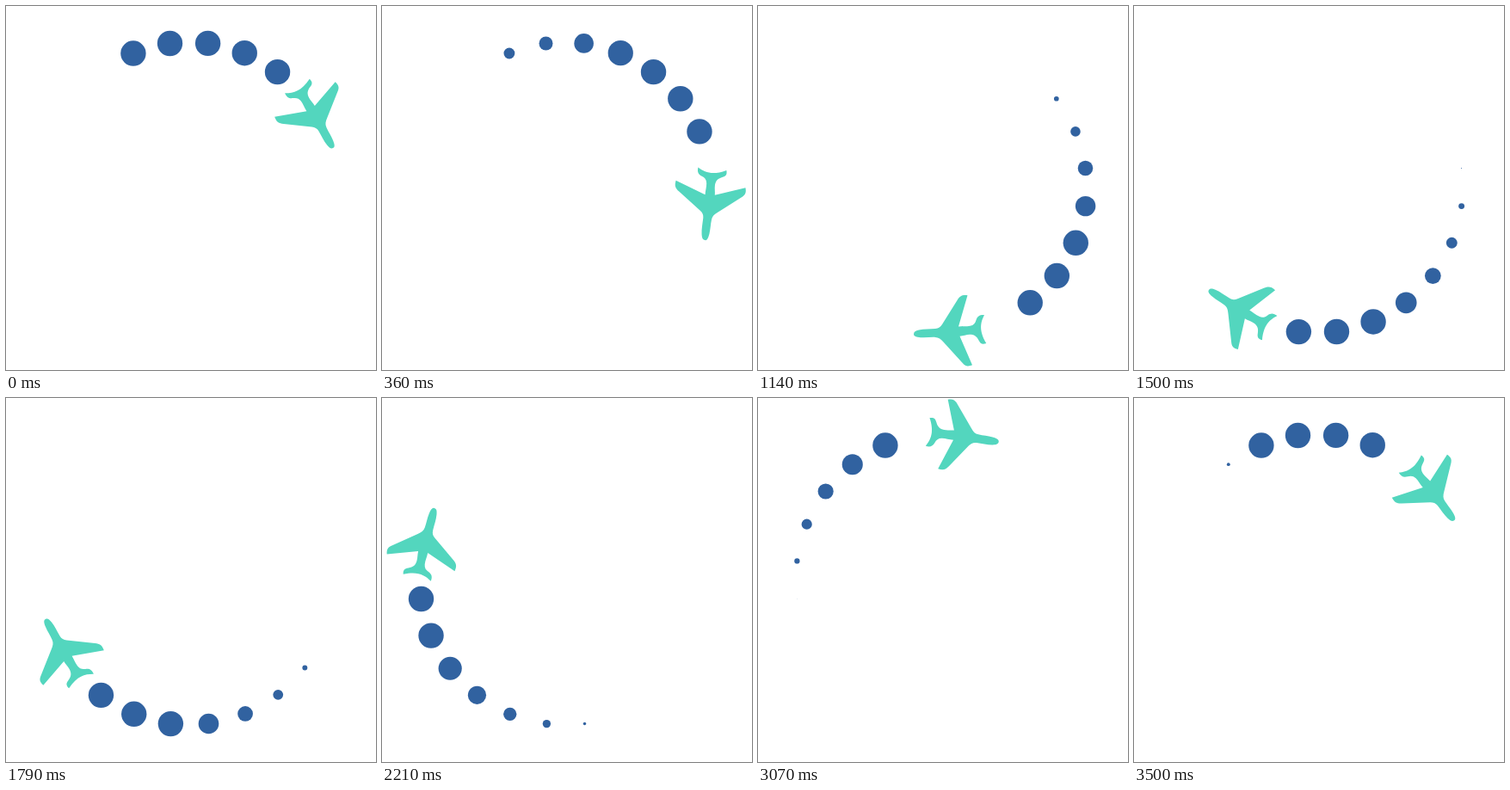
These frames come from a looping animation (430x423 px, 3570 ms). An HTML page with a canvas:

```html
<!DOCTYPE html>
<html lang="en">
<head>
<meta charset="utf-8">
<title>Circling plane</title>
<style>
  html, body { margin: 0; width: 100%; height: 100%; overflow: hidden; background: #fff; }
  canvas { display: block; }
</style>
</head>
<body>
<canvas id="stage" width="430" height="423"></canvas>
<script>
const ctx = document.getElementById('stage').getContext('2d');
const CX = 213, CY = 211, ORBIT = 169, DOT = 14.7;
const LOOP = 3570, FRAME = LOOP / 50;
const PLANE_TICK = 29; // tick at which the outline below is in place
const FADE = 16;       // ticks a dot takes to shrink away

const plane = new Path2D(`M181 381.3 C181 378.6 183 377.6 187 376.6 C193 375.2 200 375.4 206 375
  C210 374.7 212 373 214 370 L231.5 342 C234.5 337.2 237 335.4 243.5 336.2
  L233 372.5 C238 372 242 372.6 246.5 371.8 C250.5 371 252.5 368.5 253.5 365
  C255 360.5 257.5 358.7 263 359 C258.5 368 256.5 377 265.3 392
  C260.5 393.8 258.5 392.5 256.5 388.5 C254 383.5 251 381.8 246 381.8
  C242 381.9 238.5 383.4 234.5 383.7 L249 417.3
  C244 419.2 241.5 418.8 238.5 415.8 L215.5 390.5
  C212.5 387 210 385 206 384.9 C200 384.7 195 385.6 189 385.2
  C184 384.8 181 384 181 381.3 Z`);

const rad = deg => deg * Math.PI / 180;
const frameStart = n => Math.round(n * FRAME / 10) * 10;

// The picture holds for each frame; the motion runs on 40 ms ticks.
function tickAt(ms) {
  let n = Math.floor(ms / FRAME);
  if (ms >= frameStart(n + 1)) n++;
  else if (ms < frameStart(n)) n--;
  return Math.ceil(frameStart(n % 50) / 40);
}

const appears = m => 3.75 * m - 8.4;

function shrinks(m) {
  if (m > 21) return Infinity;
  return Math.max(0, 16.1 + (m - 3) * (m < 3 ? 3.6 : 3.222));
}

function draw(now) {
  const tick = tickAt(now % LOOP);
  ctx.clearRect(0, 0, 430, 423);

  ctx.fillStyle = '#3162a0';
  for (let m = -2; m <= 26; m++) {
    const size = Math.min(1, 1 - (tick - shrinks(m)) / FADE);
    if (tick < appears(m) || size <= 0) continue;
    const a = rad(7.35 + 15 * m);
    ctx.beginPath();
    ctx.arc(CX + ORBIT * Math.sin(a), CY - ORBIT * Math.cos(a), DOT * size, 0, 2 * Math.PI);
    ctx.fill();
  }

  ctx.save();
  ctx.translate(CX, CY);
  ctx.rotate(rad(4 * (tick - PLANE_TICK)));
  ctx.translate(-CX, -CY);
  ctx.fillStyle = '#53d6be';
  ctx.fill(plane);
  ctx.restore();
}

const start = performance.now();
function loop() {
  draw(performance.now() - start);
  requestAnimationFrame(loop);
}
loop();
</script>
</body>
</html>
```
